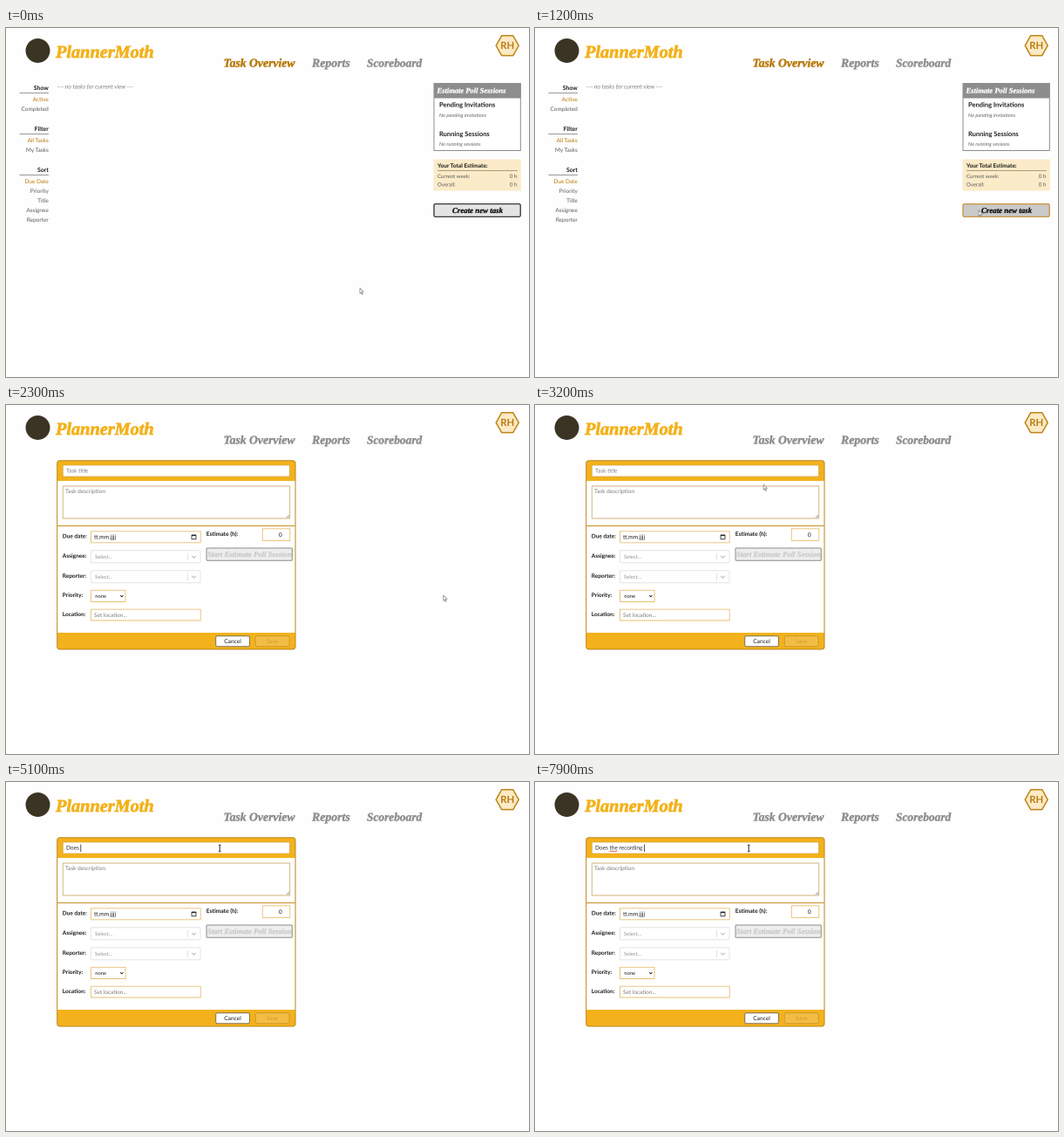
Animation, 600 px wide and 400 px high, one loop 8 s. Source, as an HTML page with a canvas:

```html
<!DOCTYPE html>
<html lang="en">
<head>
<meta charset="utf-8">
<title>Task board</title>
<style>
  html, body { margin: 0; width: 100%; height: 100%; overflow: hidden; background: #fefefe; }
  canvas { display: block; width: 600px; height: 400px; }
</style>
</head>
<body>
<canvas id="stage"></canvas>
<script>
const LOOP = 8000, STEP = 100;
const SANS = 'Lato, "Open Sans", sans-serif';
const SCRIPT = '"Liberation Serif", serif';
const AMBER = '#f3b21b', BROWN = '#b97a0c', GREY = '#8f8f8f', INK = '#1c1c1c', SOFT = '#5c5c5c', FIELD = '#e5bf72';

// Twice the display resolution keeps the tiny type smooth.
const canvas = document.getElementById('stage');
const ctx = canvas.getContext('2d');
const ratio = 2 * (window.devicePixelRatio || 1);
canvas.width = 600 * ratio;
canvas.height = 400 * ratio;
ctx.scale(ratio, ratio);
ctx.textRendering = 'geometricPrecision';
ctx.lineJoin = 'round';

function text(str, x, y, size, color, style = '', align = 'left', family = SANS) {
  ctx.font = `${style} ${size}px ${family}`;
  ctx.textAlign = align;
  ctx.fillStyle = color;
  ctx.fillText(str, x, y);
}

// Heavy italic lettering, thickened with a thin outline.
function script(str, x, y, size, color, align) {
  text(str, x, y, size, color, 'italic bold', align, SCRIPT);
  ctx.strokeStyle = color;
  ctx.lineWidth = size * 0.035;
  ctx.strokeText(str, x, y);
}

function box(x, y, w, h, fill, stroke, radius = 0, weight = 1) {
  ctx.beginPath();
  ctx.roundRect(x, y, w, h, radius);
  if (fill) { ctx.fillStyle = fill; ctx.fill(); }
  if (stroke) { ctx.strokeStyle = stroke; ctx.lineWidth = weight; ctx.stroke(); }
}

function line(points, color, weight = 1) {
  ctx.beginPath();
  points.forEach(([x, y]) => ctx.lineTo(x, y));
  ctx.strokeStyle = color;
  ctx.lineWidth = weight;
  ctx.stroke();
}

function chevron(x, y, r, color, weight) {
  line([[x - r, y - r / 2], [x, y + r / 2], [x + r, y - r / 2]], color, weight);
}

function drawHeader(overview) {
  ctx.beginPath();
  ctx.arc(36.5, 26, 14, 0, 7);
  ctx.fillStyle = '#3b3424';
  ctx.fill();
  script('PlannerMoth', 57, 34, 20.3, AMBER);
  script('Task Overview', 249.5, 44.4, 13.7, overview ? BROWN : GREY);
  script('Reports', 351, 44.4, 13.8, GREY);
  script('Scoreboard', 414, 44.4, 13.4, GREY);

  ctx.beginPath();
  for (let i = 0; i < 6; i++) {
    const a = i * Math.PI / 3;
    ctx.lineTo(575.2 + 13 * Math.cos(a), 20.2 + 13.2 * Math.sin(a));
  }
  ctx.closePath();
  ctx.fillStyle = '#fbeac6';
  ctx.fill();
  ctx.strokeStyle = '#c08414';
  ctx.lineWidth = 1.5;
  ctx.stroke();
  text('RH', 575.2, 24.2, 11.3, BROWN, 'bold', 'center');
}

const MENU = [
  ['Show', 71, ['Active', 'Completed']],
  ['Filter', 118, ['All Tasks', 'My Tasks']],
  ['Sort', 165, ['Due Date', 'Priority', 'Title', 'Assignee', 'Reporter']]
];

function drawOverview(hover) {
  for (const [title, y, items] of MENU) {
    text(title, 48.8, y, 6.9, INK, 'bold', 'right');
    line([[15.5, y + 3.5], [49, y + 3.5]], '#777', 0.8);
    items.forEach((item, i) =>
      text(item, 48.8, y + 13.2 + i * 10.9, 6.5, i ? SOFT : BROWN, '', 'right'));
  }
  text('--- no tasks for current view ---', 59, 69.4, 6.85, '#808080', 'italic');

  box(491, 63.5, 99.3, 77, '#fff', '#8d8d8d');
  box(490.5, 63, 100.3, 17.5, '#8d8d8d');
  script('Estimate Poll Sessions', 494.5, 74.6, 8.5, '#fff');
  text('Pending Invitations', 497, 90.6, 7.5, INK, 'bold');
  text('No pending invitations', 497, 102, 5.8, '#666', 'italic');
  text('Running Sessions', 497, 124, 7.5, INK, 'bold');
  text('No running sessions', 497, 135.2, 5.8, '#666', 'italic');

  box(490.5, 150.5, 100.3, 36, '#fbebc8');
  text('Your Total Estimate:', 495, 160, 6.55, INK, 'bold');
  line([[495, 163.5], [587, 163.5]], '#94835c', 0.8);
  [['Current week:', 172.2], ['Overall:', 181.6]].forEach(([label, y]) => {
    text(label, 495, y, 6.05, SOFT);
    text('0 h', 586.4, y, 6.2, SOFT, '', 'right');
  });

  box(491, 201.7, 99.2, 14.6, hover ? '#cacaca' : '#e4e4e4', hover ? '#c88a2c' : '#222', 1.5, 1.2);
  script('Create new task', 541, 212, 8.85, '#111', 'center');
}

function drawSelect(y) {
  box(97.5, y, 125.5, 14, '#fff', '#e0e0e0', 1, 0.8);
  text('Select...', 102, y + 9.2, 5.95, '#929292');
  line([[208.5, y + 3], [208.5, y + 11.5]], '#d6d6d6', 0.7);
  chevron(215.5, y + 7.2, 2.3, '#b0b0b0', 0.9);
}

function drawForm(typed, caret, misspelt) {
  box(58.7, 63.7, 273.3, 216.3, AMBER, null, 3);
  box(59, 87, 272.8, 174, '#fff');
  box(58.7, 63.7, 273.3, 216.3, null, '#bd8418', 3);
  line([[59, 138.5], [332, 138.5]], '#cf9b3c', 1.2);

  box(65.3, 69, 260.2, 13, '#fff', '#d8a545', 0, 0.8);
  text(typed || 'Task title', 69, 77.6, 6.5, typed ? '#262626' : '#7c7c7c');
  if (caret) {
    const x = 69.3 + ctx.measureText(typed).width;
    line([[x, 71.5], [x, 80]], '#222', 0.8);
  }
  if (misspelt) {
    const start = 69 + ctx.measureText('Does ').width;
    const wave = [];
    for (let i = 0; i <= 9; i++) wave.push([start + i, 79.4 + (i % 2 ? 0.4 : -0.4)]);
    line(wave, '#d9534a', 0.8);
  }

  box(65.3, 93, 260.4, 37, '#fff', '#d2b27c', 0, 0.9);
  text('Task description', 68, 101.2, 6.5, '#7c7c7c');
  line([[322, 129], [325, 126]], '#888', 0.6);
  line([[324, 129], [325, 128]], '#888', 0.6);

  [['Due date:', 152.6], ['Assignee:', 175], ['Reporter:', 197.8], ['Priority:', 220.2], ['Location:', 242]]
    .forEach(([label, y]) => text(label, 64.8, y, 6.5, INK, 'bold'));

  box(97.5, 144.8, 125.7, 13, '#fff', FIELD, 0, 0.9);
  text('tt.mm.jjjj', 101, 153.5, 6.7, INK);
  box(213, 149, 5, 4.8, null, '#222', 0.4, 0.8);
  box(213, 148.7, 5, 1.4, '#222');
  drawSelect(166.8);
  drawSelect(189.8);
  box(97.5, 212.3, 39.6, 13.2, '#fff', FIELD, 0, 0.9);
  text('none', 102.3, 221, 5.8, INK);
  chevron(132.8, 219, 1.6, '#222', 1);
  box(97.5, 234.2, 125.7, 12.8, '#fff', FIELD, 0, 0.9);
  text('Set location...', 101, 243, 6.45, '#7c7c7c');

  text('Estimate (h):', 229.8, 150, 6.65, INK, 'bold');
  box(294.3, 141.8, 31.5, 13.6, '#fff', FIELD, 0, 0.9);
  text('0', 316.6, 151, 6.5, INK, '', 'right');
  box(230, 164, 98.3, 14.2, '#eeeeee', '#8c8c8c', 1);
  script('Start Estimate Poll Session', 279.3, 173.9, 8.7, '#cbcbcb', 'center');

  box(240.7, 264.7, 38.8, 12, '#fff', '#80735a', 1.8);
  text('Cancel', 260, 273, 6.6, INK, '', 'center');
  box(286.3, 264.7, 38.8, 12, '#f3bd45', '#cf9a2f', 1.8);
  text('Save', 305.6, 273, 6.5, '#d29b31', '', 'center');
}

function drawArrow(x, y) {
  ctx.beginPath();
  [[0, 0], [0, 6.2], [1.4, 5], [2.4, 7.4], [3.3, 7], [2.4, 4.7], [4.2, 4.5]]
    .forEach(([dx, dy]) => ctx.lineTo(x + dx, y + dy));
  ctx.closePath();
  ctx.fillStyle = '#fff';
  ctx.fill();
  ctx.strokeStyle = '#8a8a8a';
  ctx.lineWidth = 0.8;
  ctx.stroke();
}

function drawBeam(x, y) {
  line([[x, y - 3.5], [x, y + 3.5]], '#222', 1);
  line([[x - 1.5, y - 3.8], [x + 1.5, y - 3.8]], '#333', 0.8);
  line([[x - 1.5, y + 3.8], [x + 1.5, y + 3.8]], '#333', 0.8);
}

const ease = p => p * p * (3 - 2 * p);
const span = (t, from, to) => Math.min(1, Math.max(0, (t - from) / (to - from)));
const mix = (a, b, p) => a.map((v, i) => v + (b[i] - v) * p);

function pointer(t) {
  const rest = [406, 298], button = [510, 209], below = [501.8, 218], title = [245.2, 76];
  if (t < 1200) return mix(rest, button, ease(span(t, 0, 900)));
  if (t < 2600) return mix([509, 209], below, span(t, 1700, 1900));
  const p = ease(span(t, 2600, 3300)), bend = [400, 215];
  return mix(mix(below, bend, p), mix(bend, title, p), p);
}

const inside = ([x, y], l, t, r, b) => x >= l && x <= r && y >= t && y <= b;

// The moment each character of the title is typed.
const TITLE = 'Does the recording ';
const KEYS = [4400, 4600, 4800, 4900, 5100, 5600, 5800, 5900, 6100, 6600,
  6800, 7000, 7100, 7200, 7300, 7400, 7500, 7700, 7800];

function draw(time) {
  const t = Math.floor(time % LOOP / STEP) * STEP;
  const at = pointer(t);
  const form = t >= 2300;
  ctx.fillStyle = '#fefefe';
  ctx.fillRect(0, 0, 600, 400);
  drawHeader(!form);
  if (form) {
    const count = KEYS.filter(k => k <= t).length;
    const caret = count > 0 || (t >= 3500 && t < 4000);
    drawForm(TITLE.slice(0, count), caret, t >= 6200);
  } else {
    drawOverview(t >= 900);
  }
  const editing = form && (inside(at, 65, 69, 326, 82) || inside(at, 65, 93, 326, 130));
  (editing ? drawBeam : drawArrow)(...at);
}

const start = performance.now();
function tick() {
  draw(performance.now() - start);
  requestAnimationFrame(tick);
}
tick();
</script>
</body>
</html>
```
